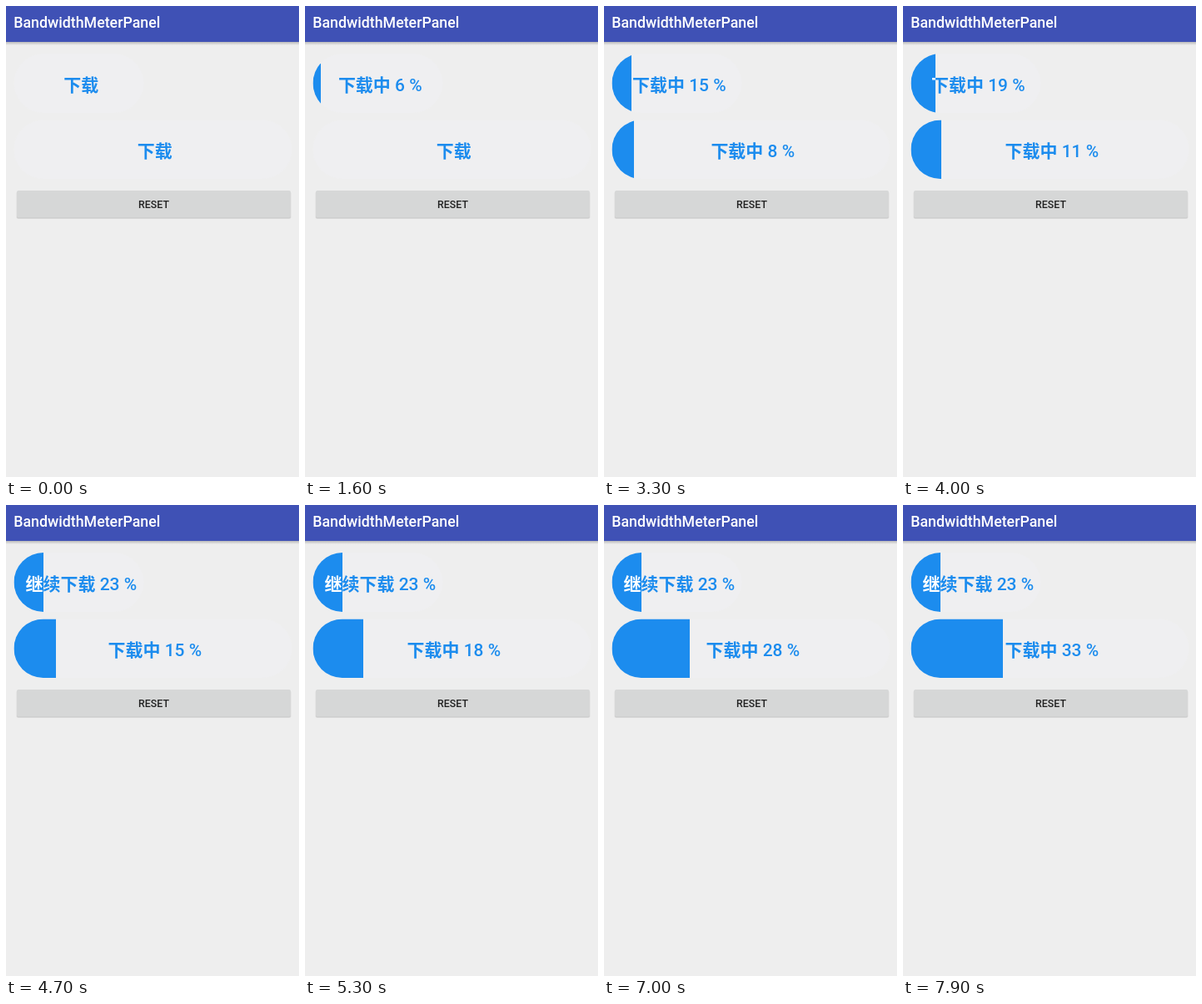
An HTML page that plays this animation: 352 by 564 pixels, repeating every 8000 ms.

```html
<!DOCTYPE html>
<html lang="zh">
<head>
<meta charset="utf-8">
<title>Progress buttons</title>
<style>
  html, body { margin: 0; width: 100%; height: 100%; overflow: hidden; background: #eee; }
  svg { display: block; width: 352px; height: 564px; }
  text { font-family: Roboto, "Noto Sans CJK SC", "Noto Sans CJK", sans-serif; font-weight: 500; }
  .label { font-size: 21px; text-anchor: middle; white-space: pre; }
  .word { font-weight: 700; }
  .track { fill: #efeff1; }
  .blue { fill: #1c8cee; }
  .white { fill: #fff; }
</style>
</head>
<body>
<svg id="stage" viewBox="0 0 352 564">
  <defs>
    <linearGradient id="shade" x2="0" y2="1">
      <stop offset="0" stop-color="#000" stop-opacity=".22"/>
      <stop offset="1" stop-color="#000" stop-opacity="0"/>
    </linearGradient>
  </defs>
  <rect width="352" height="564" fill="#eee"/>
  <rect y="43" width="352" height="4" fill="url(#shade)"/>
  <rect width="352" height="43" fill="#3f51b5"/>
  <text x="9.2" y="25.8" font-size="17.8" fill="#fff">BandwidthMeterPanel</text>

  <rect x="12.5" y="222" width="330" height="33" rx="2" fill="#000" opacity=".07"/>
  <rect x="13" y="222" width="329" height="32.3" rx="2" fill="#000" opacity=".1"/>
  <rect x="13" y="221" width="329" height="32.5" rx="2" fill="#d6d7d7"/>
  <text x="177.5" y="242" font-size="12.4" text-anchor="middle" fill="#222">RESET</text>
</svg>
<script>
const LOOP = 8000, TICK = 100;
const stage = document.getElementById('stage');

// Each entry in steps is the tick at which the bar gains one percent.
const bars = [
  { x: 9.5, y: 57, width: 156, height: 71, textX: 90.3, baseline: 102, pauseAt: 47,
    steps: [7, 9, 11, 13, 14, 16, 18, 20, 22, 23, 25, 27, 29, 31, 33, 35, 36, 38, 40, 42, 44, 46, 47] },
  { x: 9.5, y: 136.5, width: 334, height: 70.5, textX: 178.8, baseline: 181, pauseAt: Infinity,
    steps: [21, 22, 24, 26, 28, 30, 31, 33, 35, 37, 39, 41, 43, 44, 46, 48, 50, 52, 54, 55, 57, 59, 61,
            63, 65, 66, 68, 70, 72, 74, 76, 77, 79] }
];

function add(parent, tag, attrs = {}) {
  const el = document.createElementNS('http://www.w3.org/2000/svg', tag);
  for (const name in attrs) el.setAttribute(name, attrs[name]);
  return parent.appendChild(el);
}

function addLabel(parent, bar, color) {
  const text = add(parent, 'text', { class: 'label ' + color, x: bar.textX, y: bar.baseline });
  return { word: add(text, 'tspan', { class: 'word' }), count: add(text, 'tspan') };
}

function build(bar, index) {
  const { x, y, width, height } = bar;
  const pill = { x, y, width, height, rx: height / 2 };
  const clip = add(stage, 'clipPath', { id: 'fill' + index });
  bar.fill = add(clip, 'rect', { x, y, width: 0, height });
  add(stage, 'rect', { ...pill, class: 'track' });
  const under = addLabel(stage, bar, 'blue');
  const done = add(stage, 'g', { 'clip-path': `url(#fill${index})` });
  add(done, 'rect', { ...pill, class: 'blue' });
  bar.labels = [under, addLabel(done, bar, 'white')];
}

function update(bar, tick) {
  const percent = bar.steps.filter(step => step <= tick).length;
  const word = !percent ? '下载' : tick >= bar.pauseAt ? '继续下载' : '下载中';
  // Whole-pixel right edge keeps the fill crisp.
  bar.fill.setAttribute('width', percent && Math.round(bar.x + bar.width * percent / 100) - bar.x);
  for (const label of bar.labels) {
    label.word.textContent = word;
    label.count.textContent = percent ? ` ${percent} %` : '';
  }
}

const start = performance.now();
function render() {
  const tick = Math.floor((performance.now() - start) % LOOP / TICK);
  bars.forEach(bar => update(bar, tick));
  requestAnimationFrame(render);
}

bars.forEach(build);
render();
</script>
</body>
</html>
```
